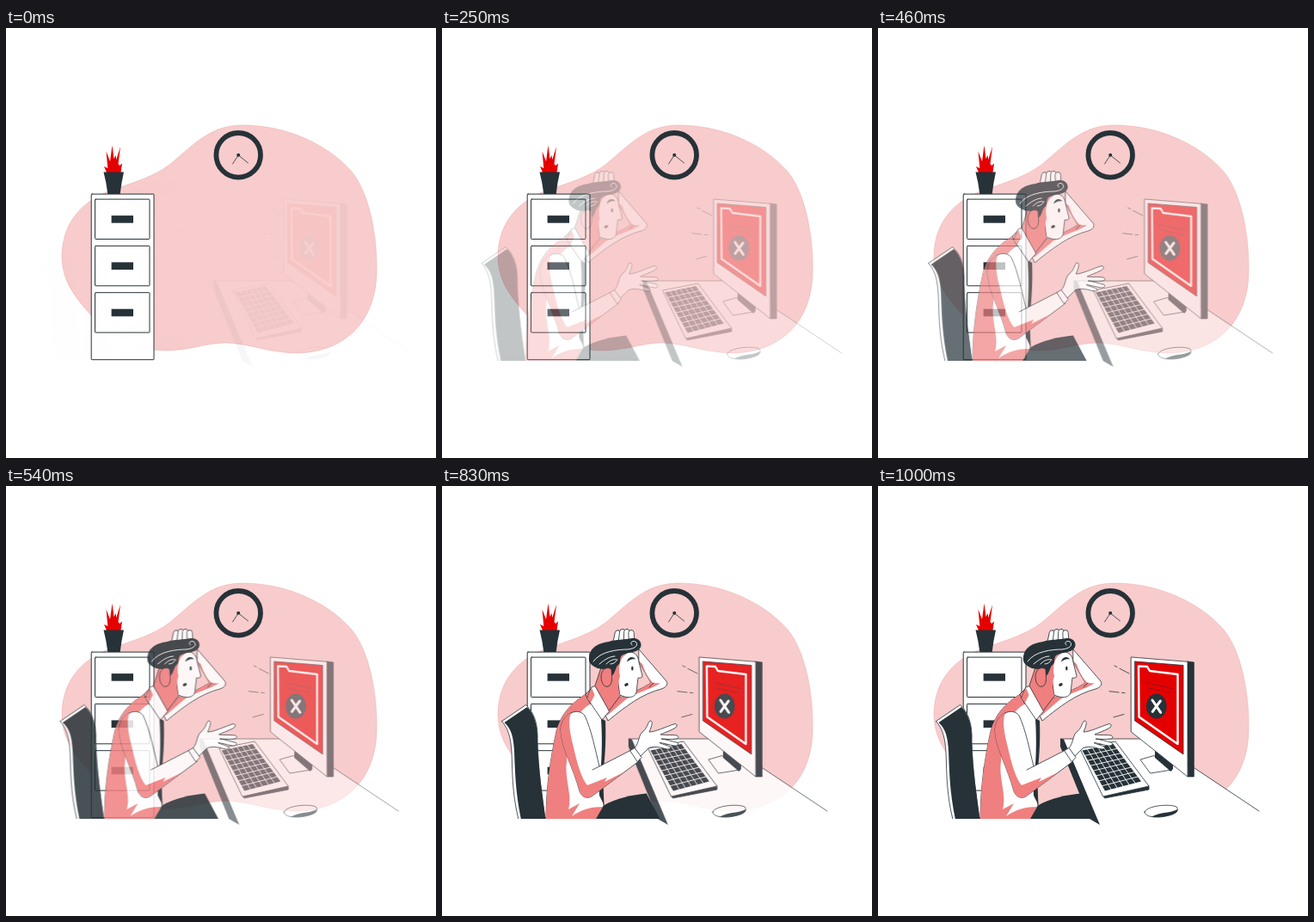
An HTML page that plays this animation: 500x500 px, repeating every 1.04 s.

```html
<!DOCTYPE html>
<html lang="en">
<head>
<meta charset="utf-8">
<title>Computer trouble</title>
<style>
  html, body { margin: 0; width: 100%; height: 100%; overflow: hidden; background: #fff; }
  svg { display: block; width: 100vw; height: 100vh; }
  .dark { fill: #263238; }
  .white { fill: #fff; }
  .rose { fill: #f07f7f; }
  .red { fill: #e50000; }
  .edge { stroke: #263238; stroke-width: .8; stroke-linejoin: round; stroke-linecap: round; }
  .line { fill: none; }
  .light { fill: none; stroke: #fff; stroke-linecap: round; }
</style>
</head>
<body>
<svg viewBox="0 0 500 500">
  <clipPath id="floor"><rect y="100" width="500" height="286.8"/></clipPath>

  <path fill="#f8cccc" stroke="#ea9a9a" stroke-width=".4" d="M272 113C320 112 371 132 401 166C422 190 432 240 431 284C430 345 390 378 337 378C302 377 285 367 255 366C228 367 215 375 184 375C140 374 120 355 100 335C75 308 65 290 65 264C66 225 90 198 130 186C150 179 171 173 190 159C215 139 235 114 272 113Z"/>

  <!-- clock -->
  <circle cx="270.2" cy="147.8" r="25.8" fill="none" stroke="#263238" stroke-width="5.8"/>
  <path class="line edge" d="M263.5 158L270.2 147.8L281.5 157"/>
  <circle class="dark" cx="270.2" cy="147.8" r="2"/>

  <!-- plant and cabinet -->
  <path class="red" d="M117 168L114 161L118.3 163L116.5 143.5L121 155L123.5 136.5L125.5 152L127.5 148L128.3 153L133 138L130.5 158L132 160L135 157.5L133.5 168Z"/>
  <path class="dark" d="M113.5 167.5H137L134.5 180L132.7 193H118.3L116.3 180Z"/>
  <rect class="white edge" x="99.2" y="193.1" width="72.8" height="192.6" rx=".8" style="stroke-width:1"/>
  <g id="drawers"></g>

  <g id="desk">
    <path class="white" d="M213 294H317L443 378L300 394H258Z"/>
    <path class="line edge" d="M213 294H317L443 378"/>
    <path class="dark" d="M212 293.5L216 294.5L258 394L246 387L212 303Z"/>

    <!-- keyboard -->
    <path class="dark edge" d="M262 360L263.5 363L315 353V349Z"/>
    <path class="white edge" d="M235 305L276 297L315 349L262 361Z"/>
    <path class="dark" d="M237.5 307.5L273.5 300L306 343.5L264 354.5Z"/>
    <path id="keys" class="light" stroke-width=".9"/>

    <!-- monitor -->
    <path class="white edge" d="M305.3 318L321 313.5L341.5 330L317 334Z"/>
    <path class="dark" d="M322 300L343 318V329L340.5 332L322 316Z"/>
    <path class="dark edge" d="M359.5 204L367.3 205V338H360.3Z"/>
    <path class="white edge" d="M294.5 199L360 204.3V338L294.5 286Z"/>
    <path class="red edge" d="M298.7 204L355 208.5V312L298.7 273Z"/>
    <path class="light" stroke-width="2.4" stroke-linejoin="round" d="M303 209.5L313 210L316 215L348.5 219V300L303.5 268.5Z"/>
    <path fill="none" stroke="#7d1a1c" stroke-width=".8" d="M311 228.5L342.5 235.5M314.5 235L328 238M331 238.5L339.5 240.5"/>
    <ellipse class="dark" cx="323.8" cy="256" rx="11.8" ry="14.6"/>
    <path class="light" stroke-width="3" d="M319 249L328.7 263.3M328.3 250L319.2 262.3"/>

    <path class="line edge" d="M275 209L278 210.5M281 212.3L292 218M269 238.7L280 240M283.5 240.3L287 240.7M274 268.8L286 265.5"/>

    <!-- mouse -->
    <path class="white edge" d="M310 379C312 372 338 369 347 373C351 377 345 383 328 385C316 385.5 310 383 310 379Z"/>
    <path class="dark" d="M318 384.8C327 379 338 381 348.7 376C349 382 335 386 318 384.8Z"/>
  </g>

  <g id="man" clip-path="url(#floor)">
    <!-- chair -->
    <path class="white edge" d="M67.5 273.5L95.5 254.5C104 262 110 275 109 297C110 330 114 360 118 388H87C79 355 80 330 79 310C78 292 75 282 67.5 273.5Z"/>
    <path class="dark" d="M70.5 275L97 257C105 264 110 280 109 297C110 330 115 360 118.5 388H90C83 355 83 330 82 308C81 292 79 283 70.5 275Z"/>

    <!-- raised arm -->
    <path class="white edge" d="M227 190L259 227C261 231 259 234 253 236C230 242 212 256 191 273L186 262L205 246C216 242 230 236 241 229C236 220 231 212 227 204Z"/>
    <path class="rose" d="M227.5 204L231 207C235 219 239 225 244 229L252 229.5C239 237 225 240 212 248L190 267L186 262L205 246C216 242 230 236 241 229C236 220 231 212 227.5 204Z"/>
    <path class="line edge" d="M244 229L239 234"/>
    <g id="knuckles"></g>

    <!-- torso -->
    <path class="white edge" d="M167 241C148 252 136 266 131 285C124 318 119 350 119 388H178L186 372C183 350 187 300 184 272Z"/>
    <path class="rose" d="M167 241C148 252 136 266 131 285C124 318 119 350 119 388H178L186 373C172 373 160 376 149 384L158 369L145 376C150 360 140 340 143 320C146 290 150 262 174 252Z"/>
    <path class="dark" d="M176.5 388L186 371.5C200 363 220 359 235.7 357.5L252 388Z"/>
    <path class="dark" d="M183 270L188 273C189 300 187 320 185 338L186.5 371L181 360C180 345 186 320 183 270Z"/>

    <!-- head -->
    <path class="rose edge" d="M176 232L184 208H203L206 243L191 263Z"/>
    <path class="white edge" d="M200 205L214 193C221 192 226 196 227 205L231 221C231 223 228 223.5 226 223L224 240C222 247 213 247 205 243Z"/>
    <path class="rose" d="M188 206L211 195C204 203 203 212 205 221C202 231 203 238 205 243.5L190 238Z"/>
    <path class="dark" d="M213 204.5C214 199 220 197 223 201.5C219 200.5 216 202 213 204.5Z"/>
    <ellipse class="dark" cx="219.3" cy="212" rx="1.2" ry="2.6"/>
    <ellipse class="dark" cx="212.4" cy="231" rx="2.4" ry="1.7" transform="rotate(-25 212.4 231)"/>
    <path class="dark" d="M169 203C168 190 177 183 192 181C200 178 211 179 219 177C228 176 232 184 228 189C224 194 216 193 209 196C203 198 207 205 203 208C199 211 200 218 195 221L192 212L185 213L179 212C173 209 170 207 169 203Z"/>
    <path class="rose edge" d="M195 213C190 209 183 213 183 222C183 230 188 236 193 232C197 228 195 220 195 213Z"/>
    <path class="light" stroke-width=".9" d="M174 204C182 192 203 190 214 190C223 189 227 185 223 181C219 179 216 183 219 185M181 207C187 202 193 198 199 198M189 207C194 202 198 201 202 202M194 207C197 207 200 205 201 203"/>

    <!-- collar -->
    <path class="rose edge" d="M165 242L173 234L177 244L171 253Z"/>
    <path class="white edge" d="M172 234L176 232.5L192.5 262L184 272L167 247Z"/>
    <path class="rose" d="M172 234.5L167 246.5L171 252L175.5 243Z"/>

    <!-- reaching arm -->
    <path class="white edge" d="M222 305C228 297 226 291 231 286C237 282 237 275 240 273C244 273 242 279 239 286C246 286 258 280 269 276.5C272 277 272 280 268 282C262 285 256 287 252 289C259 290 266 289 271 290C274 291 273 294 270 294C264 295 258 294 253 294C260 295 266 297 272 298.5C274 300.5 271 302.5 268 302C262 301 256 299 251 298.5C256 301 262 302 264 304C264 307 258 306 254 304.5C248 303 241 303 238 305L229 314Z"/>
    <path class="white edge" d="M148 264C153 261 161 262 164 267C172 284 176 306 181 326L218 307L227 320L172 361C166 364 161 362 158 355C151 328 136 303 136 283C137 273 141 267 148 264Z"/>
    <path class="rose" d="M148 264C144 274 147 288 151 304C155 322 160 340 167 348L190 339L187 344L209 333L172 361C166 364 161 362 158 355C151 328 136 303 136 283C137 273 141 267 148 264Z"/>
    <path class="line edge" d="M181 326L173 330"/>
    <path class="white edge" d="M217 307.5L222 304.5L230 315.5L225.5 320.5Z"/>
  </g>
</svg>
<script>
  const $ = id => document.getElementById(id);
  const range = (n, f) => Array.from({ length: n }, (_, i) => f(i)).join('');

  $('drawers').innerHTML = range(3, i => {
    const y = 199.1 + i * 54.3;
    return `<rect class="white edge" x="103.5" y="${y}" width="63.5" height="46.4" rx=".8" style="stroke-width:1"/>
      <rect class="dark" x="122.6" y="${y + 19}" width="25.4" height="8.6"/>`;
  });

  $('knuckles').innerHTML = range(4, i =>
    `<rect class="white edge" x="${197.3 + i * 6}" y="${i % 3 ? 166.3 : 167.5}" width="6.4" height="18" rx="3.2" transform="rotate(${12 - i * 5} ${200.5 + i * 6} 180)"/>`);

  // Gaps between the keys, laid across the keyboard's four corners
  const [a, b, c, d] = [[237.5, 307.5], [273.5, 300], [306, 343.5], [264, 354.5]];
  const mix = (p, q, t) => p.map((v, i) => v + (q[i] - v) * t);
  const gaps = (n, p, q, r, s) => range(n - 1, i => {
    const t = (i + 1) / n;
    return `M${mix(p, q, t)}L${mix(r, s, t)}`;
  });
  $('keys').setAttribute('d', gaps(6, a, b, d, c) + gaps(8, a, d, b, c));

  // 24 pictures a second, with the easing sampled at each step
  const slideIn = (id, from, easing) => $(id).animate(
    [
      { transform: `translateX(${from}px)`, opacity: 0, easing },
      { transform: 'translateX(0px)', opacity: 1 }
    ],
    { duration: 1040, delay: -3, iterations: Infinity, easing: 'steps(25, jump-start)' }
  );
  slideIn('desk', 30, 'linear');
  slideIn('man', -30, 'cubic-bezier(.36, -.01, .5, 1.38)');
</script>
</body>
</html>
```
